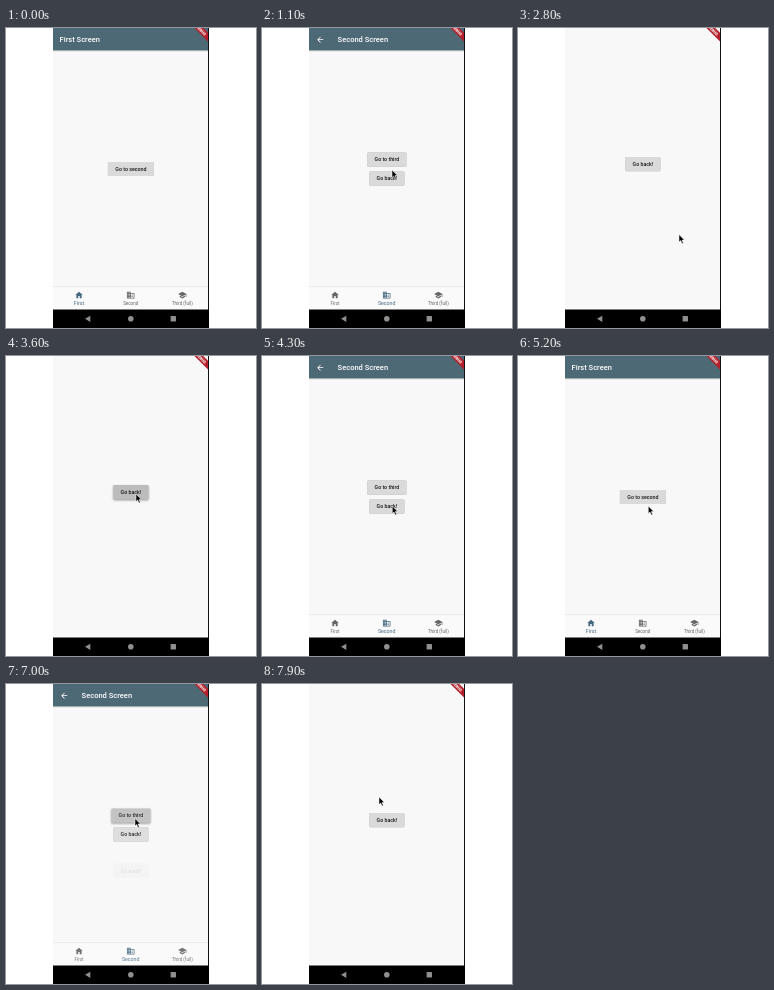
An HTML page for the animation above (8 s loop, 250 by 300 pixels).

```html
<!DOCTYPE html>
<html lang="en">
<head>
<meta charset="utf-8">
<title>Tab navigation</title>
<style>
html, body { margin: 0; width: 100%; height: 100%; overflow: hidden; background: #fff; }
svg { display: block; width: 250px; height: 300px; font-family: Roboto, sans-serif; }
.title { font-size: 7.54px; font-weight: 500; fill: #fff; }
.btn text { font-size: 5.28px; font-weight: 500; fill: #181818; text-anchor: middle; }
.btn rect { fill: #dadada; filter: drop-shadow(0 .6px .5px rgba(0,0,0,.32)); }
.btn.down rect { fill: #bcbcbc; filter: drop-shadow(0 1.2px 1.2px rgba(0,0,0,.4)); }
.tab { fill: #656565; }
.tab text { font-size: 4.52px; text-anchor: middle; }
.tab.on { fill: #466980; }
.tab.on text { font-size: 5.28px; }
</style>
</head>
<body>
<svg viewBox="0 0 250 300">
  <defs>
    <clipPath id="screen"><rect x="47" width="155" height="281.5"/></clipPath>
    <linearGradient id="shade" x2="0" y2="1">
      <stop stop-color="#000" stop-opacity=".25"/><stop offset="1" stop-color="#000" stop-opacity="0"/>
    </linearGradient>
  </defs>
  <g clip-path="url(#screen)">
    <rect x="47" width="155" height="282" fill="#f8f8f8"/>
    <rect x="47" y="22" width="155" height="2" fill="url(#shade)"/>
    <rect x="47" width="155" height="22.3" fill="#4e6976"/>
    <g id="first"><text class="title" x="53.6" y="14.3">First Screen</text></g>
    <g id="second">
      <path fill="#fff" transform="translate(53.7 7.2) scale(.377)" d="M20 11H7.83l5.59-5.59L12 4l-8 8 8 8 1.41-1.41L7.83 13H20z"/>
      <text class="title" x="75.6" y="14.3">Second Screen</text>
    </g>
    <rect x="47" y="258.2" width="155" height="1.2" fill="#e9e9e9"/>
    <rect x="47" y="259.3" width="155" height="23" fill="#fafafa"/>
    <g id="tabs"></g>
    <g id="third"><rect x="47" width="155" height="282" fill="#f8f8f8"/></g>
    <g id="banner">
      <path d="M188.5 0H197.2L202 4.8V13.5Z" fill="#b4202b"/>
      <text transform="translate(195.2 4.4) rotate(45)" x="-1.2" y="0" text-anchor="middle" font-size="3.85" font-weight="900" fill="#fff">DEBUG</text>
    </g>
  </g>
  <path d="M202 0h1v282h-1z" fill="#111"/>
  <path d="M47 281.5h156V300H47z" fill="#000"/>
  <g fill="#8f8f8f">
    <path d="M79 290.8l5.3-3.1v6.2z"/>
    <circle cx="124.8" cy="290.8" r="2.8"/>
    <rect x="164.6" y="288.1" width="5.4" height="5.4" rx=".4"/>
  </g>
  <path id="cursor" d="M0 0V7.6L1.7 6L3 9L4.3 8.4L3 5.6H5.4Z" fill="#000" stroke="#fff" stroke-width=".5"/>
</svg>
<script>
const LOOP = 8000, STEP = 100;
const $ = id => document.getElementById(id);
const NS = 'http://www.w3.org/2000/svg';

function add(parent, tag, attrs, text) {
  const el = document.createElementNS(NS, tag);
  for (const k in attrs) el.setAttribute(k, attrs[k]);
  if (text) el.textContent = text;
  return parent.appendChild(el);
}

function button(page, label, cy, width) {
  const g = add($(page), 'g', { class: 'btn' });
  add(g, 'rect', { x: 124.9 - width / 2, y: cy - 7.1, width, height: 14.2, rx: .8 });
  add(g, 'text', { x: 124.9, y: cy + 1.8 }, label);
  return g;
}

const buttons = {
  toSecond: button('first', 'Go to second', 141, 46),
  toThird: button('second', 'Go to third', 131.6, 39),
  toFirst: button('second', 'Go back!', 150.5, 35),
  back: button('third', 'Go back!', 136.1, 35)
};

const tabs = [
  ['First', 73, 'M10 20v-6h4v6h5v-8h3L12 3 2 12h3v8z'],
  ['Second', 124.7, 'M12 7V3H2v18h20V7H12zM6 19H4v-2h2v2zm0-4H4v-2h2v2zm0-4H4V9h2v2zm0-4H4V5h2v2zm4 12H8v-2h2v2zm0-4H8v-2h2v2zm0-4H8V9h2v2zm0-4H8V5h2v2zm10 12h-8v-2h2v-2h-2v-2h2v-2h-2V9h8v10zm-2-8h-2v2h2v-2zm0 4h-2v2h2v-2z'],
  ['Third (full)', 176.3, 'M5 13.18v4L12 21l7-3.82v-4L12 17l-7-3.82zM12 3L1 9l11 6 9-4.91V17h2V9L12 3z']
].map(([label, x, d]) => {
  const g = add($('tabs'), 'g', { class: 'tab' });
  add(g, 'path', { d, transform: `translate(${x - 4.52} 262.6) scale(.377)` });
  add(g, 'text', { x, y: 276.8 }, label);
  return g;
});

// time, x, y of the pointer tip
const path = [
  [100, 150, 303], [700, 130, 142], [1200, 130, 142], [1800, 171, 270],
  [2500, 171, 270], [2800, 161, 206.5], [3200, 130, 138], [3900, 130, 138],
  [4200, 130.3, 150], [5300, 130.3, 150], [5600, 130, 142], [6300, 130, 142],
  [6700, 129, 134.5], [7400, 129, 134.5], [7900, 117, 113]
];
const presses = [
  ['toSecond', 800, 1100], ['back', 3500, 3900], ['toFirst', 4500, 4700],
  ['toSecond', 5700, 5900], ['toThird', 6900, 7300]
];
const pages = [[0, 0], [1100, 1], [4700, 0], [5900, 1]];
const FADE = 300, opens = [2250, 6920], closes = [3600];

const clamp = v => Math.min(1, Math.max(0, v));

function bezier(x1, y1, x2, y2) {
  const at = (a, b, s) => 3 * a * s * (1 - s) ** 2 + 3 * b * s * s * (1 - s) + s ** 3;
  return x => {
    let lo = 0, hi = 1;
    for (let i = 0; i < 24; i++) {
      const mid = (lo + hi) / 2;
      if (at(x1, x2, mid) < x) lo = mid; else hi = mid;
    }
    return at(y1, y2, lo);
  };
}
const easeIn = bezier(.42, 0, 1, 1);
const slideUp = bezier(.4, 0, .2, 1);
const glide = bezier(.42, 0, .58, 1);

function pointer(t) {
  const i = path.findIndex(p => p[0] > t);
  if (i === 0) return path[0].slice(1);
  if (i < 0) return path[path.length - 1].slice(1);
  const [t0, x0, y0] = path[i - 1], [t1, x1, y1] = path[i];
  const k = glide((t - t0) / (t1 - t0));
  return [x0 + (x1 - x0) * k, y0 + (y1 - y0) * k];
}

function draw(t) {
  const page = pages.filter(p => p[0] <= t).pop()[1];
  $('first').style.display = page ? 'none' : '';
  $('second').style.display = page ? '' : 'none';
  tabs.forEach((tab, i) => tab.classList.toggle('on', i === page));

  for (const name in buttons) {
    const down = presses.some(([n, a, b]) => n === name && t >= a && t < b);
    buttons[name].classList.toggle('down', down);
  }

  const sum = starts => starts.reduce((s, a) => s + clamp((t - a) / FADE), 0);
  const shown = clamp(sum(opens) - sum(closes));
  $('third').setAttribute('opacity', easeIn(shown));
  $('third').setAttribute('transform', `translate(0 ${70.4 * (1 - slideUp(shown))})`);
  $('third').style.display = shown ? '' : 'none';

  $('cursor').setAttribute('transform', `translate(${pointer(t).join(' ')})`);
}

const start = performance.now();
function tick() {
  const t = (performance.now() - start) % LOOP;
  draw(Math.floor(t / STEP) * STEP);
  requestAnimationFrame(tick);
}
tick();
</script>
</body>
</html>
```
